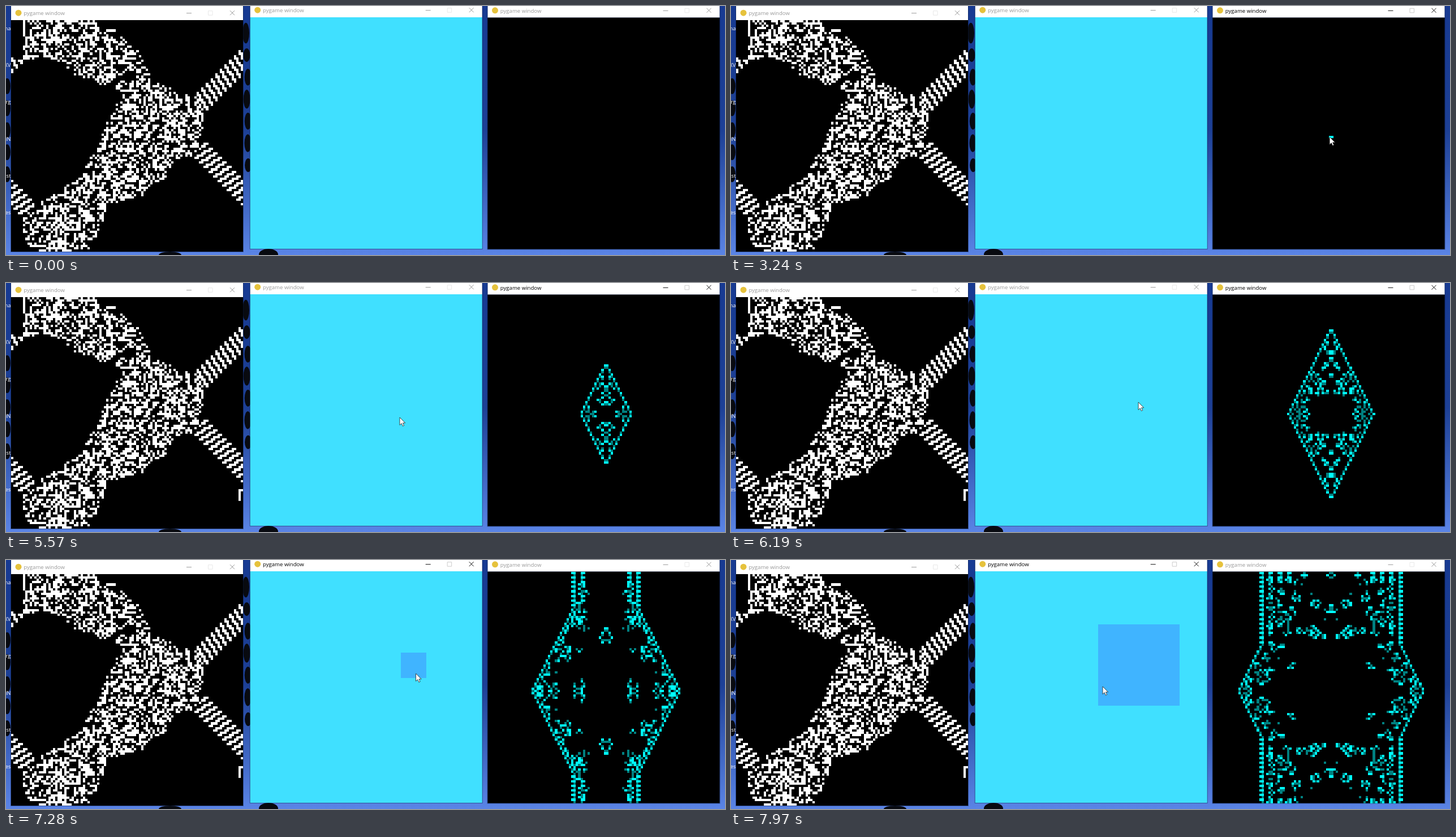
Recreate the animation shown at these times as an HTML page. Size 1271 by 441 pixels, loop 8000 ms.

```html
<!DOCTYPE html>
<html lang="en">
<head>
<meta charset="utf-8">
<title>Cellular automata</title>
<style>
  html, body { margin: 0; width: 100%; height: 100%; overflow: hidden; background: #1c3f9a; }
  svg { display: block; width: 1271px; height: 441px; }
  text { font-family: "Open Sans", "Noto Sans", sans-serif; }
  .cells { shape-rendering: crispEdges; }
  .bar text { font-size: 9.6px; fill: #999; }
  .bar path { fill: none; stroke: #999; }
  .bar .max { stroke: #e8e8e8; }
  .active text { fill: #000; }
  .active path { stroke: #111; }
  .active .max { stroke: #ccc; }
</style>
</head>
<body>
<svg viewBox="0 0 1271 441">
  <defs>
    <linearGradient id="sky" x2="0" y2="1">
      <stop offset="0" stop-color="#173a92"/>
      <stop offset=".5" stop-color="#1d4096"/>
      <stop offset="1" stop-color="#5a84e6"/>
    </linearGradient>
  </defs>
  <rect width="1271" height="441" fill="url(#sky)"/>
  <g id="spots" fill="#080a10"></g>
  <g id="labels" fill="#fff" font-size="9.5" text-anchor="end"></g>
  <g id="windows"></g>
  <g class="cells">
    <g fill="#fff" transform="translate(9 25) scale(4.1)">
      <path id="maze"/>
      <path id="trace" d="M98 83h2v1h-1v4h-1z"/>
    </g>
    <rect id="square" fill="#40b4ff"/>
    <g transform="translate(851.5 20.6) scale(4.1)">
      <path id="dying" fill="#008080"/>
      <path id="firing" fill="#0ff"/>
    </g>
  </g>
  <path id="cursor" d="M0 0V13.6L3.2 10.7L5.3 15.5L7.6 14.4L5.5 9.9H9.7z" fill="#fff" stroke="#222" stroke-width=".8"/>
</svg>
<script>
const LOOP = 8000, STEP = 68.65, N = 100, CELL = 4.1;
const el = id => document.getElementById(id);
const wrap = v => (v + N) % N;
const mix = (a, b, p) => a.map((v, i) => v + (b[i] - v) * p);
const show = (node, on) => { node.style.display = on ? '' : 'none'; };

let seed = 7;
const random = () => (seed = (seed * 16807) % 2147483647) / 2147483647;

// Desktop behind the windows
const spot = (x, y, rx, ry) => `<ellipse cx="${x}" cy="${y}" rx="${rx}" ry="${ry}"/>`;
let spots = spot(290, 441, 20, 6) + spot(464, 440, 17, 10);
for (let y = 48; y < 300; y += 39) {
  spots += spot(424 + random() * 5, y, 6, 10 + random() * 9);
  if (y > 100) spots += spot(2, y + 16, 6, 14);
}
el('spots').innerHTML = spots;
el('labels').innerHTML = ['ma', 'XV', 'rg', 'IN', 'est', 'res'].map((s, i) =>
  `<text x="8.5" y="${43 + i * 65.2}">${s}</text>`).join('');

function windowMarkup(id, x, top, fill) {
  const mid = top - 12.8;
  return `<rect x="${x - 1}" y="-2" width="412" height="${top + 413}" fill="#0a1a3c" opacity=".45"/>
    <rect x="${x}" width="410" height="${top}" fill="#fff"/>
    <rect x="${x}" y="${top}" width="410" height="410" fill="${fill}"/>
    <g id="${id}" class="bar" transform="translate(${x} ${mid})">
      <circle cx="13" r="5.5" fill="#e6c23c"/>
      <text x="22.3" y="4">pygame window</text>
      <path d="M310 .5h9M387 -4l8 8m0 -8l-8 8"/>
      <path class="max" d="M348.5 -3.5h7.5v7.5h-7.5z"/>
    </g>`;
}
el('windows').innerHTML = windowMarkup('antBar', 9, 25, '#000') +
  windowMarkup('cyclicBar', 431.7, 20, '#40e0ff') + windowMarkup('brainBar', 851.5, 20.6, '#000');

function cellPath(grid, state) {
  let d = '';
  grid.forEach((v, i) => { if (v === state) d += `M${i % N} ${i / N | 0}h1v1h-1z`; });
  return d;
}

// Lumpy region: discs of varying radius strung along a spine of [x, y, radius]
function chaosCells() {
  const spine = [[25, 78, 18], [75, 42, 45], [125, 60, 52], [170, 90, 50], [212, 110, 33], [232, 150, 28],
    [305, 195, 42], [320, 242, 27], [250, 210, 66], [228, 270, 68], [160, 320, 32], [110, 385, 58], [60, 395, 38]];
  const inside = new Uint8Array(N * N);
  for (let s = 0; s < spine.length - 1; s += .25) {
    const k = Math.floor(s);
    const [cx, cy, radius] = mix(spine[k], spine[k + 1], s - k);
    const r = radius + random() * 6 - 3;
    for (let i = 0; i < N * N; i++) {
      const dx = 9 + (i % N + .5) * CELL - cx, dy = 25 + ((i / N | 0) + .5) * CELL - cy;
      if (dx * dx + dy * dy < r * r) inside[i] = 1;
    }
  }
  return inside;
}

// Two diagonal highways, wrapping at the right edge, then an ant working over the chaos
function antGrid() {
  const grid = new Uint8Array(N * N), inside = chaosCells(), mask = [];
  for (let i = 0; i < N * N; i++) {
    const x = i % N, y = i / N | 0, far = x < 10 ? x + N : x;
    if (inside[i]) mask.push(i);
    else if (far > 75) {
      const up = y + far - 111, down = y - far + 31;
      if (up >= 0 && up < 12) grid[i] = (far - y + (up >> 2) + 400) % 4 < 2 ? 1 : 0;
      if (down >= 0 && down < 12) grid[i] = (far + y + (down >> 2)) % 4 < 2 ? 1 : 0;
    }
  }
  const pick = () => mask[random() * mask.length | 0];
  let pos = pick(), dir = 0;
  for (let n = 0; n < 40000; n++) {
    dir = (dir + (grid[pos] ? 3 : 1)) % 4;
    grid[pos] ^= 1;
    const x = wrap(pos % N + (2 - dir) * (dir % 2));
    const y = wrap((pos / N | 0) + (dir - 1) * (1 - dir % 2));
    pos = y * N + x;
    if (!inside[pos]) pos = pick();
  }
  return grid;
}
el('maze').setAttribute('d', cellPath(antGrid(), 1));

// Brian's Brain on a torus: 0 ready, 1 firing, 2 dying
function nextBrain(grid) {
  return grid.map((v, i) => {
    if (v) return v === 1 ? 2 : 0;
    const x = i % N, y = i / N | 0;
    let count = 0;
    for (let dy = -1; dy <= 1; dy++)
      for (let dx = -1; dx <= 1; dx++)
        if (grid[wrap(y + dy) * N + wrap(x + dx)] === 1) count++;
    return count === 2 ? 1 : 0;
  });
}
const brain = [];
let grid = new Uint8Array(N * N);
grid[51 * N + 50] = grid[51 * N + 51] = 1;
for (let g = 0; g <= 82; g++) {
  brain.push({ firing: cellPath(grid, 1), dying: cellPath(grid, 2) });
  grid = nextBrain(grid);
}

// [time, x, y]
const cursorKeys = [[60, 1122, 300], [850, 1059, 206], [1930, 1062, 228], [3400, 1058, 232], [4480, 1071, 252],
  [4980, 1071, 252], [5560, 696, 238], [6500, 729, 201], [7277, 724.5, 201], [7960, 657, 224]];
function cursorAt(t) {
  const i = cursorKeys.findIndex(key => key[0] > t);
  if (i < 0) return cursorKeys[cursorKeys.length - 1].slice(1);
  const from = cursorKeys[i - 1], to = cursorKeys[i];
  const p = (t - from[0]) / (to[0] - from[0]);
  return mix(from, to, p * p * (3 - 2 * p)).slice(1);
}

function draw(time) {
  const t = Math.floor(time / STEP) * STEP;

  el('brainBar').classList.toggle('active', t >= 1800 && t < 6500);
  el('cyclicBar').classList.toggle('active', t >= 6500);

  const { firing, dying } = brain[Math.max(0, Math.floor((t - 4675) / 41.2))];
  el('firing').setAttribute('d', t < 3000 ? '' : firing);
  el('dying').setAttribute('d', dying);
  show(el('trace'), t >= 3400);

  const r = Math.floor((t - 6980) / 57.5), square = el('square');
  show(square, r >= 0);
  if (r >= 0) {
    const size = (2 * r + 1) * CELL;
    square.setAttribute('x', 431.7 + (70 - r) * CELL);
    square.setAttribute('y', 20 + (40 - r) * CELL);
    square.setAttribute('width', size);
    square.setAttribute('height', size);
  }

  show(el('cursor'), t >= 60);
  if (t >= 60) el('cursor').setAttribute('transform', `translate(${cursorAt(t)})`);
}

const start = performance.now();
function tick() {
  draw((performance.now() - start) % LOOP);
  requestAnimationFrame(tick);
}
tick();
</script>
</body>
</html>
```
